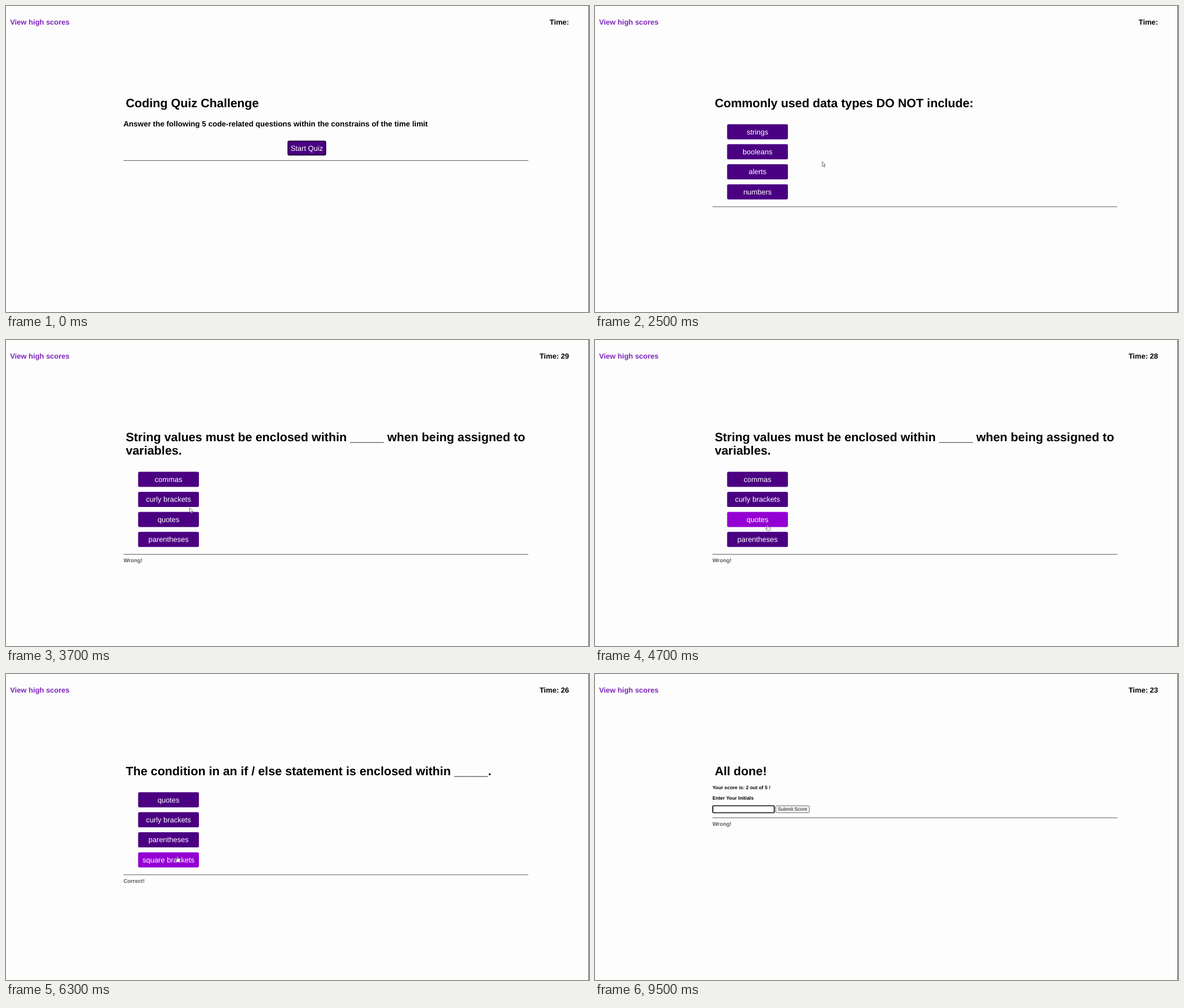
These frames come from a looping animation (1000 px wide and 526 px high, 9900 ms). An HTML page with a canvas:

```html
<!DOCTYPE html>
<html lang="en">
<head>
<meta charset="utf-8">
<title>Quiz</title>
<style>
  html, body { margin: 0; width: 100%; height: 100%; overflow: hidden; background: #fdfdfd; }
  canvas { display: block; width: 1000px; height: 526px; }
</style>
</head>
<body>
<canvas id="stage" width="1000" height="526"></canvas>
<script>
const ctx = document.getElementById('stage').getContext('2d');
const LOOP = 9900, STEP = 100;
const INDIGO = '#4b0082', VIOLET = '#9400d3';

const questions = [
  { at: 2100, title: ['Commonly used data types DO NOT include:'],
    options: ['strings', 'booleans', 'alerts', 'numbers'] },
  { at: 2900, title: ['Arrays can be used to store _____.'], note: 'Wrong!',
    options: ['numbers', 'other arrays', 'booleans', 'all of these'] },
  { at: 3400, title: ['String values must be enclosed within _____ when being assigned to', 'variables.'],
    note: 'Wrong!', options: ['commas', 'curly brackets', 'quotes', 'parentheses'] },
  { at: 5200, title: ['A very useful tool used during development and debugging for', 'printing content is:'],
    note: 'Correct!', options: ['scripts', 'terminal', 'for loops', 'console.log'] },
  { at: 5900, title: ['The condition in an if / else statement is enclosed within _____.'],
    note: 'Correct!', options: ['quotes', 'curly brackets', 'parentheses', 'square brackets'] }
];
const DONE = 7100, FOCUS = 8500;

// time, x, y of the pointer tip
const path = [
  [900, 640, 130], [1600, 517, 246], [2100, 517, 246], [2500, 389.5, 267],
  [2800, 322, 251], [3400, 322, 252], [3700, 314.5, 288], [4200, 301, 302],
  [4700, 296, 317.5], [5200, 296, 317.5], [5600, 299, 338], [5900, 299, 338],
  [6300, 294, 313], [7100, 294, 313]
];

function pointerAt(t) {
  if (t < path[0][0] || t >= DONE) return null;
  const i = path.findIndex(p => p[0] > t);
  const [t0, x0, y0] = path[i - 1], [t1, x1, y1] = path[i];
  const k = (t - t0) / (t1 - t0), e = k * k * (3 - 2 * k);
  return { x: x0 + (x1 - x0) * e, y: y0 + (y1 - y0) * e };
}

function text(str, x, y, size, { bold = true, color = '#000', align = 'left' } = {}) {
  ctx.font = `${bold ? 'bold ' : ''}${size}px "Liberation Sans", Arial, sans-serif`;
  ctx.textAlign = align;
  ctx.fillStyle = color;
  ctx.fillText(str, x, y);
}

function box(x, y, w, h, r, fill, stroke, line = 1) {
  ctx.beginPath();
  ctx.roundRect(x, y, w, h, r);
  ctx.fillStyle = fill;
  ctx.fill();
  if (!stroke) return;
  ctx.strokeStyle = stroke;
  ctx.lineWidth = line;
  ctx.stroke();
}

function button(label, x, y, w, h, mouse, edge) {
  const over = mouse && mouse.x > x && mouse.x < x + w && mouse.y > y && mouse.y < y + h;
  box(x, y, w, h, 2.6, over ? VIOLET : INDIGO, edge, 1.4);
  text(label, x + w / 2, y + h / 2 + 4.4, 12.52, { bold: false, color: '#fff', align: 'center' });
  return over;
}

function rule(y) {
  ctx.fillStyle = '#6c6c6c';
  ctx.fillRect(201.5, y, 694.5, 1.1);
}

function title(lines) {
  lines.forEach((line, i) => text(line, 205.4, 173.7 + i * 23.4, 20.87));
}

function note(str, y) {
  text(str, 201.4, y, 9.39, { color: '#5c5c5c' });
}

function intro(mouse) {
  title(['Coding Quiz Challenge']);
  text('Answer the following 5 code-related questions within the constrains of the time limit', 201.4, 207.3, 13.04);
  const over = button('Start Quiz', 483.5, 232.3, 65, 24, mouse, '#16002a');
  rule(265);
  return over;
}

function quiz(q, mouse) {
  const shift = (q.title.length - 1) * 23.4;
  title(q.title);
  let over = false;
  q.options.forEach((label, i) => {
    if (button(label, 226.6, 203.2 + shift + i * 34.4, 104.3, 26, mouse)) over = true;
  });
  rule(344.5 + shift);
  if (q.note) note(q.note, 358.9 + shift);
  return over;
}

function results(t) {
  title(['All done!']);
  text('Your score is: 2 out of 5 !', 201.4, 198, 8.35);
  text('Enter Your Initials', 201.4, 215.5, 8.35);
  const focus = t >= FOCUS;
  box(202, 226.5, 105.5, 12, 1.5, '#fff', focus ? '#101010' : '#767676', focus ? 1.7 : 1);
  if (t >= 9000 && t < 9500) {
    ctx.fillStyle = '#000';
    ctx.fillRect(204, 228.5, 1, 8);
  }
  box(309.9, 226.5, 57.8, 12, 1.5, '#efefef', '#767676');
  text('Submit Score', 338.8, 235.2, 8.35, { bold: false, color: '#222', align: 'center' });
  rule(246.6);
  note('Wrong!', 261);
}

function shape(x, y, points) {
  ctx.beginPath();
  points.forEach(([dx, dy]) => ctx.lineTo(x + dx, y + dy));
  ctx.closePath();
  ctx.fillStyle = '#fff';
  ctx.fill();
  ctx.strokeStyle = '#555';
  ctx.lineWidth = 0.8;
  ctx.stroke();
}

const ARROW = [[0.4, 0.4], [0.4, 8.6], [2.2, 7], [3.6, 10], [4.8, 9.5], [3.5, 6.6], [5.8, 6.4]];
const HAND = [[-0.8, 0.5], [0.6, 0.5], [0.8, 3.8], [4, 4.5], [4.8, 5.6], [4.4, 8.5], [3.4, 10.3],
  [-0.6, 10.3], [-3.2, 6.6], [-2.5, 5.8], [-0.8, 7]];

function draw(t) {
  ctx.fillStyle = '#fdfdfd';
  ctx.fillRect(0, 0, 1000, 526);
  ctx.fillStyle = '#555';
  ctx.fillRect(999, 0, 1, 526);

  const left = t < 3100 ? '' : ' ' + (29 - Math.floor((t - 3100) / 1000));
  text('View high scores', 7, 32, 12.52, { color: '#7d26ba' });
  text('Time:' + left, 965.7, 32, 12.52, { align: 'right' });

  const mouse = pointerAt(t);
  if (t >= DONE) return results(t);
  const q = questions.filter(item => item.at <= t).pop();
  const over = q ? quiz(q, mouse) : intro(mouse);
  if (mouse) shape(mouse.x, mouse.y, over ? HAND : ARROW);
}

ctx.textRendering = 'geometricPrecision';
const start = performance.now();
function tick() {
  const t = (performance.now() - start) % LOOP;
  draw(Math.floor(t / STEP) * STEP);
  requestAnimationFrame(tick);
}
tick();
</script>
</body>
</html>
```
